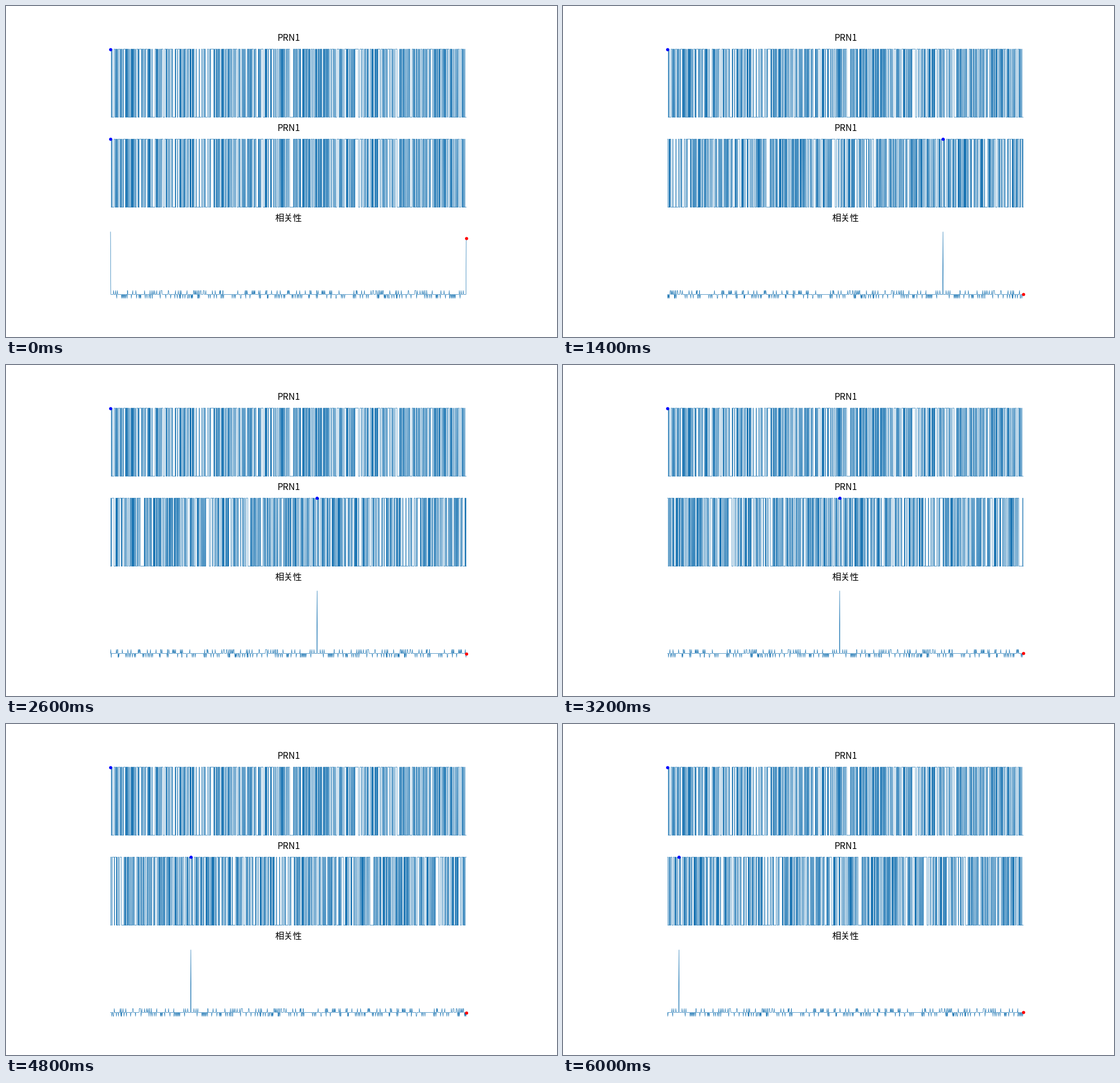
These frames come from a looping animation (966 by 580 pixels, 6200 ms). A matplotlib script:

```python
import numpy as np
import matplotlib.pyplot as plt
from matplotlib.animation import FuncAnimation

CHIPS, OVER = 1023, 10      # code length, samples per chip
N = CHIPS * OVER
STEP = 33 * OVER            # shift per frame
FRAMES = N // STEP


def lfsr(taps, outs):
    """Ten-stage shift register; taps feed back, outs are summed."""
    reg = [1] * 10
    bits = []
    for _ in range(CHIPS):
        bits.append(sum(reg[i - 1] for i in outs) % 2)
        reg = [sum(reg[i - 1] for i in taps) % 2] + reg[:-1]
    return np.array(bits)


chips = lfsr((3, 10), (10,)) ^ lfsr((2, 3, 6, 8, 9, 10), (2, 6))
code = np.repeat(chips, OVER)
spectrum = np.fft.fft(1 - 2 * code)
corr = np.fft.ifft(np.abs(spectrum) ** 2).real / N
t = np.arange(N)

plt.rcParams["font.family"] = "Noto Sans CJK JP"
fig, axes = plt.subplots(3, 1, figsize=(9.66, 5.8), dpi=100)


def panel(ax, title, data, pad, dot):
    ax.set_title(title, fontsize=11.4, pad=6)
    ax.set_xlim(-0.1 * N, 1.1 * N)
    ax.set_ylim(-pad, 1 + pad)
    ax.axis("off")
    line, = ax.plot(t, data, color="#1f77b4", lw=0.5)
    mark, = ax.plot([0], [1], dot, ms=3)
    return line, mark


panel(axes[0], "PRN1", code, 0.05, "bo")
moved, start = panel(axes[1], "PRN1", code, 0.05, "bo")
curve, last = panel(axes[2], "相关性", corr, 0.1, "ro")


def update(i):
    shift = i * STEP
    moved.set_ydata(np.roll(code, -shift))
    start.set_data([(N - shift) % N], [1])
    y = np.roll(corr, -shift)
    curve.set_ydata(y)
    last.set_data([N - 1], [y[-1]])
    return moved, start, curve, last


anim = FuncAnimation(fig, update, frames=FRAMES, interval=200, repeat=True)
plt.show()
```
